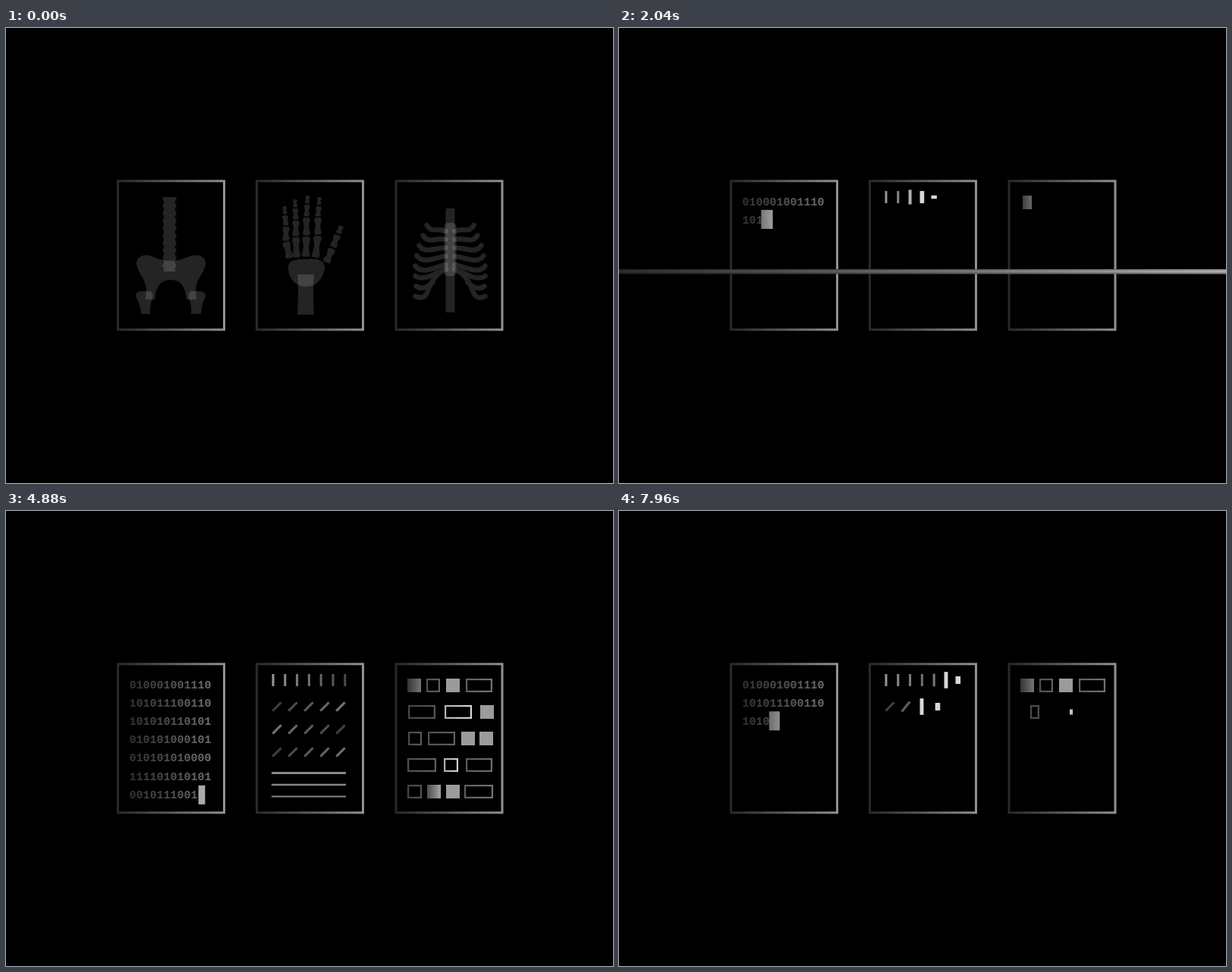
An HTML page with a canvas for the animation above (8000 ms loop, 800 px wide and 600 px high).

```html
<!DOCTYPE html>
<html lang="en">
<head>
<meta charset="utf-8">
<title>X-ray scan</title>
<style>
html, body { margin: 0; width: 100%; height: 100%; overflow: hidden; background: #000; }
canvas { display: block; }
</style>
</head>
<body>
<canvas id="stage" width="800" height="600"></canvas>
<script>
const ctx = document.getElementById('stage').getContext('2d');
const LOOP = 8000;
const BONE = 'rgba(255,255,255,.14)';

const clamp = v => Math.max(0, Math.min(1, v));
const lerp = (a, b, k) => a + (b - a) * k;
const smooth = v => { v = clamp(v); return v * v * (3 - 2 * v); };
const gray = v => { v = Math.round(v); return `rgb(${v},${v},${v})`; };

// 0..1 while an item is built, held and later taken away again
const presence = (t, start, end, duration) =>
  t < end ? clamp((t - start) / duration) : 1 - clamp((t - end) / duration);

function shadeAcross(x0, x1, from, to) {
  const g = ctx.createLinearGradient(x0, 0, x1, 0);
  g.addColorStop(0, gray(from));
  g.addColorStop(1, gray(to));
  return g;
}

// Piecewise linear lookup in rows of [time, ...values]
function keyed(keys, t) {
  const n = keys.findIndex(k => k[0] > t);
  if (n <= 0) return (n ? keys[keys.length - 1] : keys[0]).slice(1);
  const a = keys[n - 1], b = keys[n], k = (t - a[0]) / (b[0] - a[0]);
  return a.slice(1).map((v, i) => lerp(v, b[i + 1], k));
}

// ---- Bones ----
function spinePath() {
  const p = new Path2D();
  p.moveTo(207, 223);
  const edge = side => {
    for (let i = 0; i < 10; i++) {
      const k = side > 0 ? i : 9 - i, y = 223 + k * 9.8;
      const points = [[9, y], [9, y + 3], [7, y + 6], [8, y + 9.8]];
      if (side < 0) points.reverse();
      points.forEach(([dx, py]) => p.lineTo(215.5 + side * dx, py));
    }
  };
  edge(1);
  edge(-1);
  p.closePath();
  return p;
}

const spine = spinePath();
const pelvis = new Path2D(`M172 312C171 302 182 297 192 301Q205 307 217 307Q229 307 242 301
  C253 297 264 302 263 312C260 325 252 329 250 344L251 358H238Q236 332 217 332Q198 332 196 358H184
  L185 344C183 329 175 325 172 312Z`);
const femurs = new Path2D(`M171 354Q171 347 179 347H190Q195 349 193 357Q189 366 190 377H178Q178 367 171 354Z
  M263 354Q263 347 255 347H244Q239 349 241 357Q245 366 244 377H257Q257 367 263 354Z`);

function longBone(path, x0, y0, x1, y1, w) {
  const len = Math.hypot(x1 - x0, y1 - y0);
  const ux = (x1 - x0) / len, uy = (y1 - y0) / len;
  const at = (along, across) => [x0 + ux * along - uy * across, y0 + uy * along + ux * across];
  const h = w / 2, cap = Math.min(3, len / 4);
  path.moveTo(...at(0, -h * .7));
  path.lineTo(...at(cap, -h));
  path.quadraticCurveTo(...at(len / 2, -h * .3), ...at(len - cap, -h));
  path.lineTo(...at(len, -h * .7));
  path.lineTo(...at(len, h * .7));
  path.lineTo(...at(len - cap, h));
  path.quadraticCurveTo(...at(len / 2, h * .3), ...at(cap, h));
  path.lineTo(...at(0, h * .7));
  path.closePath();
}

function fingersPath() {
  const p = new Path2D();
  // tip x, base x, palm x, then joint heights from the tip down
  const fingers = [
    [367, 369, 374, 235, 247, 262, 282, 305],
    [381, 382, 383, 226, 238, 254, 276, 304],
    [397.5, 396, 395, 221, 233, 250, 275, 303],
    [413, 411, 408, 223, 235, 250, 274, 304]
  ];
  for (const [tip, base, palm, ...y] of fingers) {
    const x = [tip, tip + (base - tip) / 3, base, base, palm];
    for (let i = 0; i < 4; i++)
      longBone(p, x[i], y[i], x[i + 1], y[i + 1] - 1.5, [6, 8, 10, 11][i]);
  }
  longBone(p, 442, 261, 438, 271, 8);
  longBone(p, 437, 273, 431, 289, 10);
  longBone(p, 430, 291, 422, 309, 11);
  return p;
}

const fingers = fingersPath();
const palm = new Path2D('M372 318C371 307 379 304 396 305C414 303 421 308 420 318C417 331 409 341 396 341C381 341 373 330 372 318Z');
const forearm = new Path2D('M384 325H406Q404 340 406 378H384Q386 340 384 325Z');

function ribsPath() {
  const p = new Path2D();
  const reach = [31, 36, 41, 44, 46, 46, 45, 46];
  for (const side of [-1, 1]) {
    reach.forEach((dx, i) => {
      const x = d => 585.5 + side * d, y = 260 + 13.4 * i;
      p.moveTo(x(dx), y);
      if (i < 5) p.bezierCurveTo(x(dx - 8), y + 12, x(20), y + 2, x(6), 268 + 11 * i);
      else if (i < 7) p.quadraticCurveTo(x(dx - 9), y + 7, x(16 + (i - 5) * 7), y - 5);
      else {
        p.quadraticCurveTo(x(33), y + 6, x(29), y - 9);
        p.quadraticCurveTo(x(20), y - 31, x(5), y - 36);
      }
    });
  }
  return p;
}

const ribs = ribsPath();

const xrays = [
  { top: 222, left: 171, right: 270, start: 1160, draw() { [spine, pelvis, femurs].forEach(p => ctx.fill(p)); } },
  { top: 220, left: 364, right: 446, start: 1306, draw() { [fingers, palm, forearm].forEach(p => ctx.fill(p)); } },
  { top: 236, left: 536, right: 636, start: 1452, draw() {
    ctx.lineWidth = 6.5;
    ctx.lineCap = 'round';
    ctx.stroke(ribs);
    ctx.lineCap = 'butt';
    ctx.fillRect(579.5, 238, 12, 137);
    ctx.beginPath();
    ctx.roundRect(577.5, 257, 16, 70, 5);
    ctx.fill();
  } }
];

function drawXray({ top, left, right, start, draw }, t) {
  const raw = clamp((t - start) / 560);
  if (raw >= 1) return;
  const y = lerp(top, 380, smooth(raw));
  ctx.save();
  if (raw > 0) {
    ctx.beginPath();
    ctx.rect(left - 30, y + 2, right - left + 60, 200);
    ctx.clip();
  }
  ctx.fillStyle = ctx.strokeStyle = BONE;
  draw();
  ctx.restore();
  if (raw === 0) return;
  const bar = (from, to, by, height, shade) => {
    const x0 = lerp(left, right, clamp(from)), x1 = lerp(left, right, clamp(to));
    ctx.fillStyle = shade;
    ctx.fillRect(x0, by, x1 - x0, height);
  };
  bar((raw - .39) * 2.2, raw * 2.15, y + 2, 5, gray(48));
  if (raw > .28) bar((raw - .5) * 2, (raw - .28) * 2.15, y - 1, 4, shadeAcross(left, right, 120, 255));
}

// ---- Binary text with a block cursor ----
const binary = ['010001001110', '101011100110', '101010110101', '010101000101',
  '010101010000', '111101010101', '001011100101'];
// time, position in rows, cursor width, cursor shade
const cursorKeys = [
  [1310, 0, 8, 90], [1440, .194, 13, 105], [2720, 2.39, 18, 220], [3840, 4.85, 19, 170],
  [4960, 6.99, 8, 170], [5720, 6.99, 8, 170], [5840, 6.787, 27, 165],
  [6400, 5.4, 24, 170], [6880, 4.25, 64, 170], [7300, 3.5, 24, 170], [7960, 2.324, 14, 145], [8000, 2.25, 14, 145]
];

function drawBinary(t) {
  if (t < 1310) return;
  const [position, width, shade] = keyed(cursorKeys, t);
  const row = Math.floor(position), x = 163 + 108 * (position - row);
  ctx.font = 'bold 15px "Liberation Mono", monospace';
  ctx.fillStyle = shadeAcross(163, 271, 50, 112);
  for (let r = 0; r <= row; r++) {
    ctx.save();
    ctx.beginPath();
    ctx.rect(160, 200, r < row ? 120 : x - 160, 200);
    ctx.clip();
    ctx.fillText(binary[r], 162.5, 233.5 + 24.2 * r);
    ctx.restore();
  }
  const y = 215.5 + 24.4 * row, h = 25, w = Math.min(width, 276 - x);
  ctx.fillStyle = shadeAcross(x, x + w, shade < 160 ? shade * .75 : shade, shade);
  ctx.fillRect(x, y, w, h);
  if (w > 30) {
    const split = x + w * .77;
    ctx.fillStyle = gray(102);
    ctx.fillRect(split, y, x + w - split, h);
    ctx.fillStyle = shadeAcross(x, split, 215, 250);
    ctx.beginPath();
    ctx.moveTo(x, y + h);
    ctx.lineTo(x, y);
    ctx.lineTo(split, y);
    ctx.fill();
  }
}

// ---- Ticks, slashes and rules ----
const tickRows = [
  { y: 223, x: 352, gap: 15.8, count: 7, turn: 0, start: 1690, end: 7790, shades: [150, 75] },
  { y: 258, x: 357, gap: 21, count: 5, turn: 1, start: 2250, end: 7710, shades: [62, 115] },
  { y: 288, x: 357, gap: 21, count: 5, turn: 1, start: 2650, end: 7210, shades: [115, 65] },
  { y: 318, x: 357, gap: 21, count: 5, turn: 1, start: 3050, end: 6710, shades: [62, 110] }
];
const rules = [
  { y: 345.5, h: 3, start: 3450, end: 6630 },
  { y: 361, h: 2.5, start: 3860, end: 6270 },
  { y: 376.5, h: 2, start: 4230, end: 5910 }
];

function drawTicks(t) {
  for (const { y, x, gap, count, turn, start, end, shades } of tickRows) {
    for (let i = 0; i < count; i++) {
      const u = presence(t, start + i * 80, end + (count - 1 - i) * 80, 240);
      if (u === 0) continue;
      const settle = clamp((u - .63) / .37);
      const h = u < .63 ? 22 * u / .63 : lerp(22, 16, settle), w = lerp(8, 3, u);
      ctx.save();
      ctx.translate(x + i * gap, y);
      ctx.rotate(turn * settle * Math.PI / 4);
      ctx.fillStyle = gray(lerp(215, lerp(...shades, i / (count - 1)), settle));
      ctx.fillRect(-w / 2, -h / 2, w, h);
      ctx.restore();
    }
  }
  for (const { y, h, start, end } of rules) {
    const u = smooth(presence(t, start, end, 330));
    const thick = lerp(7.5, h, clamp(u * 1.5 - .2));
    ctx.fillStyle = gray(lerp(255, 135, u));
    ctx.fillRect(350, y - thick / 2, u && 98 * u, thick);
  }
}

// ---- Boxes: [x, width, shade, solid] ----
const boxRows = [
  [[529, 18, 105, 1], [554, 18, 88], [580, 18, 155, 1], [606, 35, 105]],
  [[530, 36, 78], [578, 36, 195], [625, 18, 155, 1]],
  [[530, 18, 82], [556, 36, 88], [600, 18, 155, 1], [624, 18, 155, 1]],
  [[529, 38, 88], [577, 19, 190], [606, 35, 100]],
  [[529, 19, 76], [555, 18, 150, 1], [580, 18, 155, 1], [604, 38, 105]]
];
const buildDelay = [0, 230, 300, 370];

function drawBoxes(t) {
  boxRows.forEach((row, r) => row.forEach(([x, width, shade, solid], i) => {
    const last = row.length - 1;
    const removeOrder = r === 3 ? [1, 2, 0][i] : last - i;
    const removeDelay = [0, 100, 172, 240][removeOrder] + (r === 3 && i === 1 ? 44 : 0)
      - (r === 3 && i === 0 ? 0 : 0);
    const u = smooth(presence(t, 1797 + 525 * r + buildDelay[i], 5924 + 540 * (4 - r) + removeDelay, 400));
    if (u === 0) return;
    const w = width * u, h = 18 * Math.min(1, u * 3.5);
    const left = x + (width - w) / 2, top = 230 + 35 * r - h / 2;
    const fade = r === 0 && i === 0 || r === 4 && i === 1;
    const paint = solid
      ? fade ? shadeAcross(x, x + width, shade * .5, shade * 1.1) : gray(shade)
      : shadeAcross(x, x + width, shade * .9, shade * 1.1);
    if (solid || w < 6) {
      ctx.fillStyle = paint;
      ctx.fillRect(left, top, w, h);
    } else {
      ctx.strokeStyle = paint;
      ctx.lineWidth = 2.2;
      ctx.strokeRect(left + 1.1, top + 1.1, w - 2.2, h - 2.2);
    }
  }));
}

function drawFrames() {
  ctx.lineWidth = 3;
  for (const x of [147.5, 330.5, 514]) {
    ctx.strokeStyle = shadeAcross(x, x + 140, 40, 145);
    ctx.strokeRect(x, 201.8, 140, 196);
  }
}

// Three passes: down, up, down
function drawScanLine(t) {
  const pass = (t - 600) / 560;
  if (pass <= 0 || pass >= 3) return;
  const y = 298.5 - 98.5 * Math.cos(pass * Math.PI);
  ctx.fillStyle = shadeAcross(0, 800, 30, 130);
  ctx.fillRect(0, y - 3, 800, 6.5);
  ctx.fillStyle = shadeAcross(0, 800, 45, 175);
  ctx.fillRect(0, y - 1.5, 800, 3);
}

function render(now) {
  const t = now % LOOP;
  ctx.fillStyle = '#000';
  ctx.fillRect(0, 0, 800, 600);
  drawFrames();
  drawScanLine(t);
  xrays.forEach(x => drawXray(x, t));
  drawBinary(t);
  drawTicks(t);
  drawBoxes(t);
}

const began = performance.now();
function tick() {
  render(performance.now() - began);
  requestAnimationFrame(tick);
}
tick();
</script>
</body>
</html>
```
